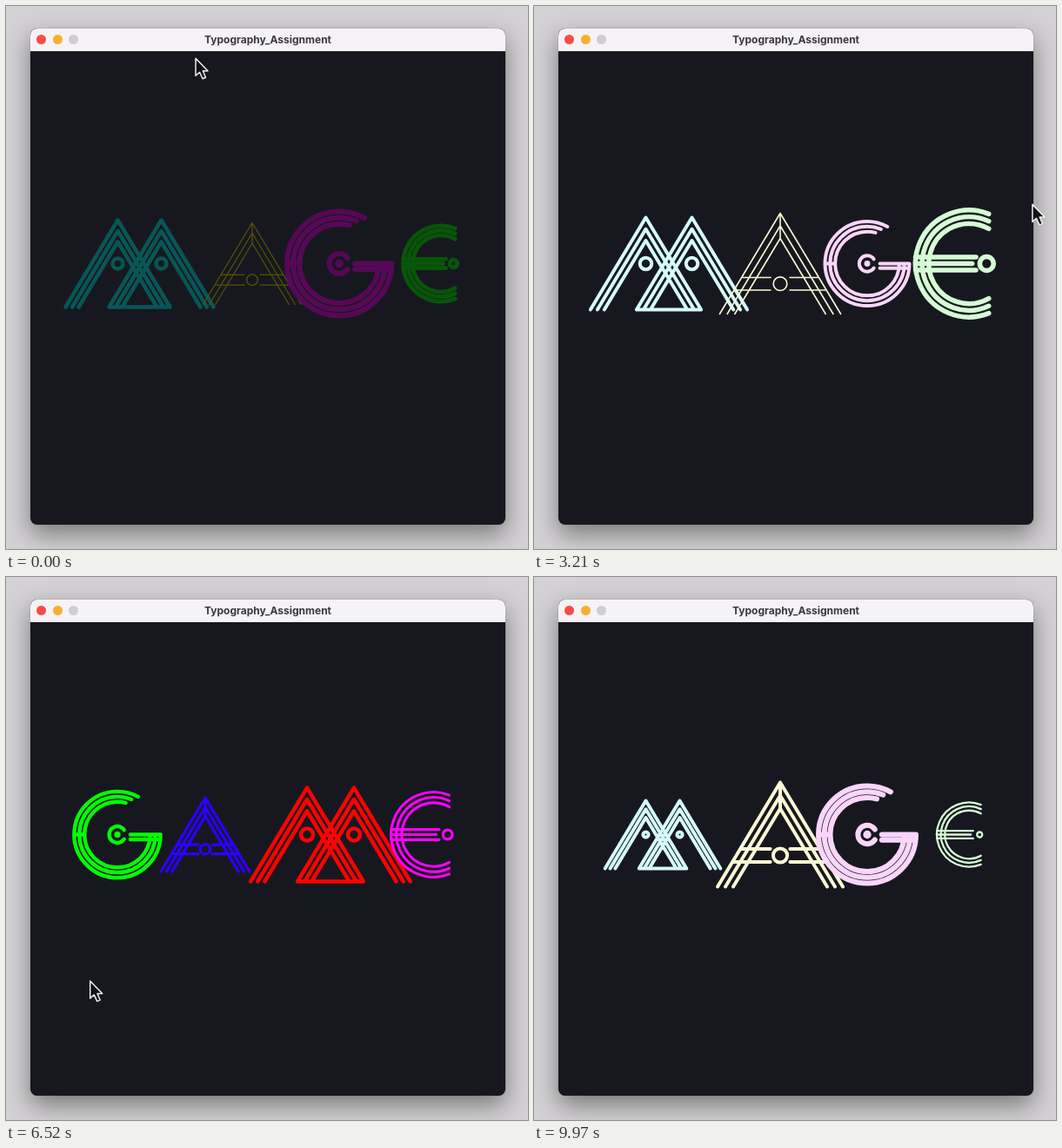
Recreate the animation shown at these times as an HTML page with a canvas. Size 600x625 px, loop 10000 ms.

```html
<!DOCTYPE html>
<html lang="en">
<head>
<meta charset="utf-8">
<title>Typography_Assignment</title>
<style>
  html, body { margin: 0; width: 600px; height: 625px; overflow: hidden; background: #d3d1d3; }
  .window {
    position: absolute; left: 28px; top: 26px; width: 546px; height: 571px;
    border-radius: 8px; overflow: hidden; background: #17181f;
    box-shadow: 0 0 1px rgba(0,0,0,.5), 0 11px 28px rgba(0,0,0,.42);
  }
  .bar {
    height: 26px; background: #f5f3f5; text-align: center;
    font: 700 12px/26px Inter, sans-serif; color: #3a383b;
  }
  .bar i { position: absolute; top: 7px; width: 11px; height: 11px; border-radius: 50%; }
  canvas { position: absolute; left: 0; top: 0; }
</style>
</head>
<body>
<div class="window">
  <div class="bar">
    <i style="left:7px;background:#fb4b47"></i>
    <i style="left:25.5px;background:#f6b02c"></i>
    <i style="left:43.5px;background:#cfcdcf"></i>
    Typography_Assignment
  </div>
</div>
<canvas id="stage" width="600" height="625"></canvas>
<script>
const ctx = document.getElementById('stage').getContext('2d');
const LOOP = 10, END = 9.97, MID_Y = 296.5, TAU = Math.PI * 2;

// key times in seconds, and the size and stroke weight of each slot at them
const TIMES = [0, 1.15, 3.21, 4.27, 5.48, 7.52, END];
const SLOTS = [
  { size: [50, 47, 53, 50, 53, 46.5, 39], weight: [4.5, 2, 4, 1.6, 6, 2.8, 4] },
  { size: [47, 46, 58, 54, 48, 37, 60], weight: [1.3, 2.5, 1.6, 5, 5.5, 1.1, 4] },
  { size: [60, 61, 48.5, 57, 47.5, 60, 56], weight: [6, 6, 4, 5.5, 2, 7, 6] },
  { size: [43.5, 43, 61.5, 54, 61.5, 37, 37], weight: [4.8, 5, 5.5, 3, 5, 1.3, 2.3] }
];
const COOL = { M: 180, A: 57, G: 300, E: 120 };
const WARM = { M: 0, A: 250, G: 120, E: 300 };
const WORDS = {
  MAGE: { x: [128.5, 283, 383, 500], hues: COOL, saturation: 82 },
  EMAG: { x: [129, 210, 375, 492], hues: WARM, saturation: 100 },
  GAME: { x: [128, 229, 346, 491.5], hues: WARM, saturation: 100 }
};

const linear = p => p;
const smooth = p => p * p * (3 - 2 * p);

function interpolate(times, values, t, ease) {
  let i = 0;
  while (i < times.length - 2 && t >= times[i + 1]) i++;
  const p = (t - times[i]) / (times[i + 1] - times[i]);
  return values[i] + (values[i + 1] - values[i]) * ease(p);
}

// the pointer circles counter-clockwise in a widening orbit, slower on the second lap
function pointerAt(t) {
  const turn = interpolate([0, 4.27, 7.52, END], [20, 373, 546, 640], t, linear) * TAU / 360;
  return [308 - (262 + 4 * t) * Math.sin(turn), 295 - 250 * Math.cos(turn)];
}

function line(...points) {
  ctx.moveTo(points[0], points[1]);
  for (let i = 2; i < points.length; i += 2) ctx.lineTo(points[i], points[i + 1]);
}
function arc(x, y, r, from = 0, to = TAU) {
  ctx.moveTo(x + r * Math.cos(from), y + r * Math.sin(from));
  ctx.arc(x, y, r, from, to);
}
function peaks(x, s) {
  for (let i = 0; i < 3; i++) {
    const half = (1.2 - 0.15 * i) * s;
    line(x - half, s, x, (0.25 * i - 1) * s, x + half, s);
  }
}

const LETTERS = {
  M(s) {
    for (const x of [0, s]) {
      peaks(x, s);
      arc(x, 0, 0.26 * (s - 27));
    }
    line(-0.2 * s, s, 1.2 * s, s);
  },
  A(s) {
    peaks(0, s);
    line(0, -s, 0, -0.5 * s);
    arc(0, 0.4 * s, 0.135 * s);
    for (const y of [0.275, 0.525])
      for (const side of [-1, 1])
        line(side * 0.19 * s, y * s, side * 0.6 * (1 + y) * s, y * s);
  },
  G(s) {
    for (let i = 0; i < 3; i++)
      arc(0, 0, (1 - 0.12 * i) * s, 0, TAU - 1.07 - 0.12 * i);
    line(-s, 0, -0.76 * s, 0);
    line(0.3 * s, 0, s, 0);
    line(0.3 * s, 0.11 * s, 0.98 * s, 0.11 * s);
    arc(0, 0, 0.19 * s, 0.6, TAU - 0.6);
    arc(0, 0, 0.03 * s);
  },
  E(s) {
    for (let i = 0; i < 3; i++) {
      const r = 1 - 0.125 * i, end = Math.acos(0.37 / r);
      arc(0, 0, r * s, end, TAU - end);
    }
    for (const y of [-0.12, 0, 0.12])
      line(-s, y * s, (y ? 0.13 : 0.06) * s, y * s);
    arc(0.33 * s, 0, 0.2 * (s - 22));
  }
};

function drawPointer(x, y) {
  ctx.save();
  ctx.translate(x, y);
  ctx.beginPath();
  line(0, 0, 0, 20, 4.5, 16, 8, 23.5, 11.5, 22, 8.3, 14.6, 14, 14.6);
  ctx.closePath();
  ctx.fillStyle = '#111216';
  ctx.strokeStyle = '#eee';
  ctx.lineWidth = 1.5;
  ctx.fill();
  ctx.stroke();
  ctx.restore();
}

function draw() {
  const t = Math.min(performance.now() / 1000 % LOOP, END);
  const [px, py] = pointerAt(t);
  const across = (px - 28) / 545, down = (py - 52) / 545;
  // the word flips across the window's diagonal; the longer way in sets the brightness
  const name = across > down ? 'MAGE' : t < 4 ? 'EMAG' : 'GAME';
  const light = 14 + 77 * Math.min(1, Math.max(across, down)) ** 2.7;
  const { x, hues, saturation } = WORDS[name];

  ctx.clearRect(0, 0, 600, 625);
  ctx.lineCap = ctx.lineJoin = 'round';
  [...name].forEach((letter, i) => {
    ctx.save();
    ctx.translate(x[i], MID_Y);
    ctx.strokeStyle = `hsl(${hues[letter]} ${saturation}% ${light}%)`;
    ctx.lineWidth = interpolate(TIMES, SLOTS[i].weight, t, smooth);
    ctx.beginPath();
    LETTERS[letter](interpolate(TIMES, SLOTS[i].size, t, smooth));
    ctx.stroke();
    ctx.restore();
  });
  drawPointer(px, py);
  requestAnimationFrame(draw);
}
draw();
</script>
</body>
</html>
```
